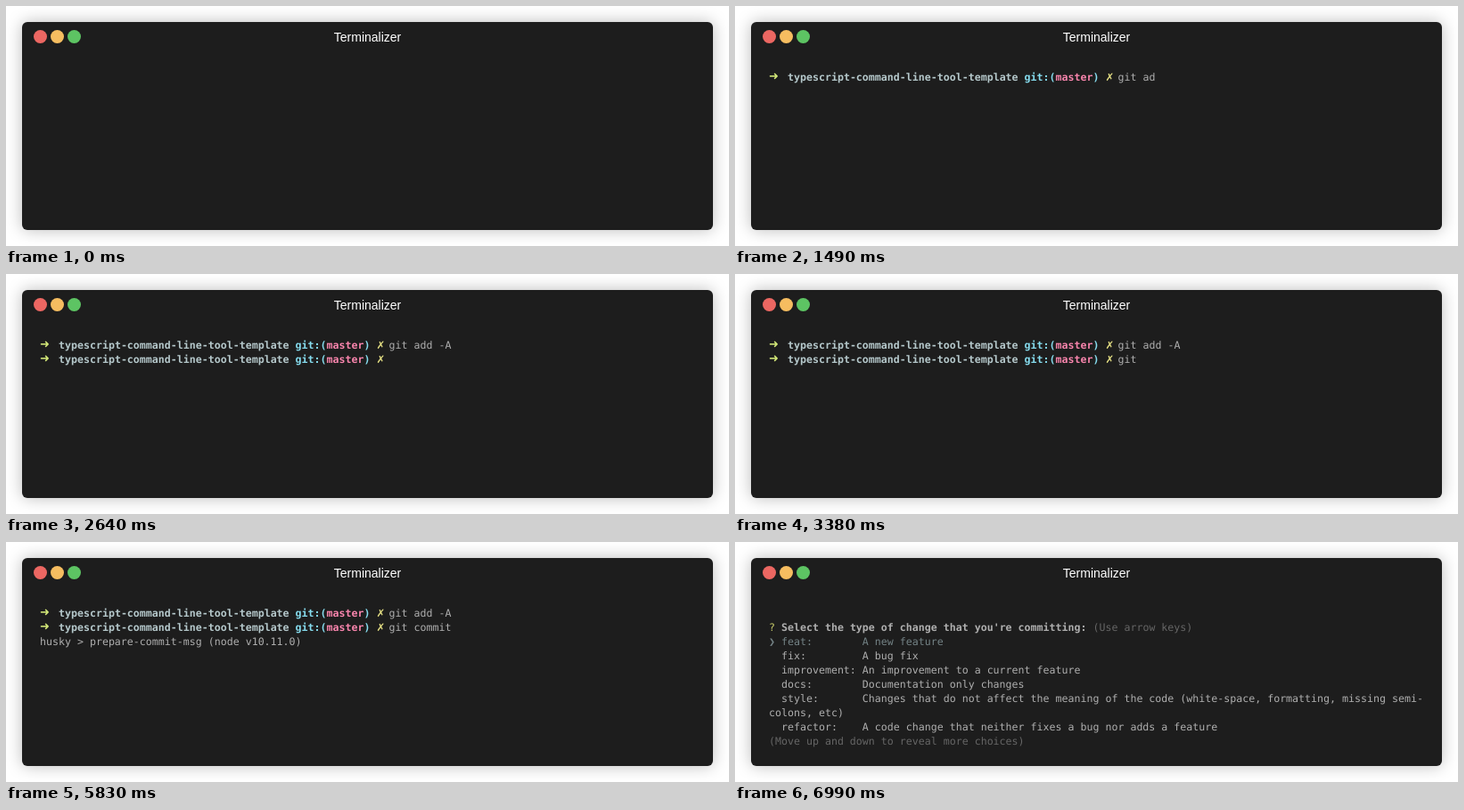
Recreate the animation shown at these times as an HTML page. Size 811 px wide and 270 px high, loop 8 s.

```html
<!DOCTYPE html>
<html lang="en">
<head>
<meta charset="utf-8">
<title>Terminal</title>
<style>
  html, body { margin: 0; width: 100%; height: 100%; overflow: hidden; background: #fff; }
  .window {
    position: absolute; left: 18px; top: 18px; width: 775px; height: 234px;
    border-radius: 6px; background: #1d1d1d; box-shadow: 0 0 18px #bbb;
  }
  .dot { position: absolute; top: 9px; width: 15px; height: 15px; border-radius: 50%; }
  .title {
    position: absolute; top: 9px; width: 100%; text-align: center; color: #fff;
    font: 14px/16px "Liberation Sans", Arial, sans-serif;
  }
  /* 11.627px gives a 7px character cell */
  #screen {
    position: absolute; left: 20px; top: 54px; color: #afafaf; white-space: pre;
    font: 11.627px/16px "DejaVu Sans Mono", monospace;
    font-variant-ligatures: none; text-rendering: geometricPrecision;
  }
  #screen div { height: 16px; }
  .glyph {
    display: inline-block; width: 7px; height: 16px; vertical-align: top;
    font-family: "DejaVu Sans", sans-serif;
  }
  .arrow { color: #d3e878; font-size: 13px; font-weight: bold; }
  .cross { color: #e6e184; }
  .mark { color: #c8cc6a; }
  .dir { color: #b5c8cb; }
  .git { color: #86dcee; }
  .branch { color: #f985ad; }
  .dim { color: #666; }
  .active { color: #748386; }
</style>
</head>
<body>
<div class="window">
  <div class="dot" style="left:13px; background:#ec6762"></div>
  <div class="dot" style="left:32px; background:#f6bd60"></div>
  <div class="dot" style="left:51px; background:#5dc463"></div>
  <div class="title">Terminalizer</div>
  <div id="screen"></div>
</div>
<script>
const LOOP = 8000;
const MENU_AT = 6990;
const screen = document.getElementById('screen');

const span = (cls, text) => `<span class="${cls}">${text}</span>`;

const prompt = span('glyph arrow', '➜') + '  <b>' +
  span('dir', 'typescript-command-line-tool-template') + ' ' +
  span('git', 'git:(') + span('branch', 'master') + span('git', ')') +
  '</b> ' + span('glyph cross', '✗') + ' ';

const commands = [
  { at: 120, text: 'git add -A', keys: [680, 790, 890, 1310, 1490, 1630, 2000, 2230] },
  { at: 2640, text: 'git commit', keys: [3140, 3290, 3380, 3740, 3860, 4050, 4210, 4400, 4570] }
];

const output = [
  { at: 5830, text: 'husky &gt; prepare-commit-msg (node v10.11.0)' },
  { at: 6890, text: 'cz-cli@4.0.3, cz-conventional-changelog@3.0.2' }
];

const choice = (name, text) => '  ' + (name + ':').padEnd(13) + text;

const menu = [
  '',
  span('mark', '?') + " <b>Select the type of change that you're committing:</b> " +
    span('dim', '(Use arrow keys)'),
  span('active', '❯' + choice('feat', 'A new feature').slice(1)),
  choice('fix', 'A bug fix'),
  choice('improvement', ' An improvement to a current feature'),
  choice('docs', 'Documentation only changes'),
  choice('style', 'Changes that do not affect the meaning of the code (white-space, formatting, missing semi-'),
  'colons, etc)',
  choice('refactor', 'A code change that neither fixes a bug nor adds a feature'),
  span('dim', '(Move up and down to reveal more choices)')
].map(line => line.replace(/^(  \w+: *)(?=[A-Z])/, m => m.trimEnd().padEnd(15))
  .replace('❯ feat:        A', '❯ feat:        A'));

// Each key time reveals one visible character; spaces come for free.
function typed({ text, keys }, t) {
  let left = keys.filter(k => k <= t).length;
  let shown = '';
  for (const ch of text) {
    if (ch !== ' ' && left-- <= 0) break;
    shown += ch;
  }
  return shown;
}

function linesAt(t) {
  if (t >= MENU_AT) return menu;
  const started = item => item.at <= t;
  return [
    ...commands.filter(started).map(c => prompt + typed(c, t)),
    ...output.filter(started).map(o => o.text)
  ];
}

let current = null;
function draw() {
  const html = linesAt(performance.now() % LOOP).map(l => `<div>${l}</div>`).join('');
  if (html !== current) screen.innerHTML = current = html;
  requestAnimationFrame(draw);
}
draw();
</script>
</body>
</html>
```
